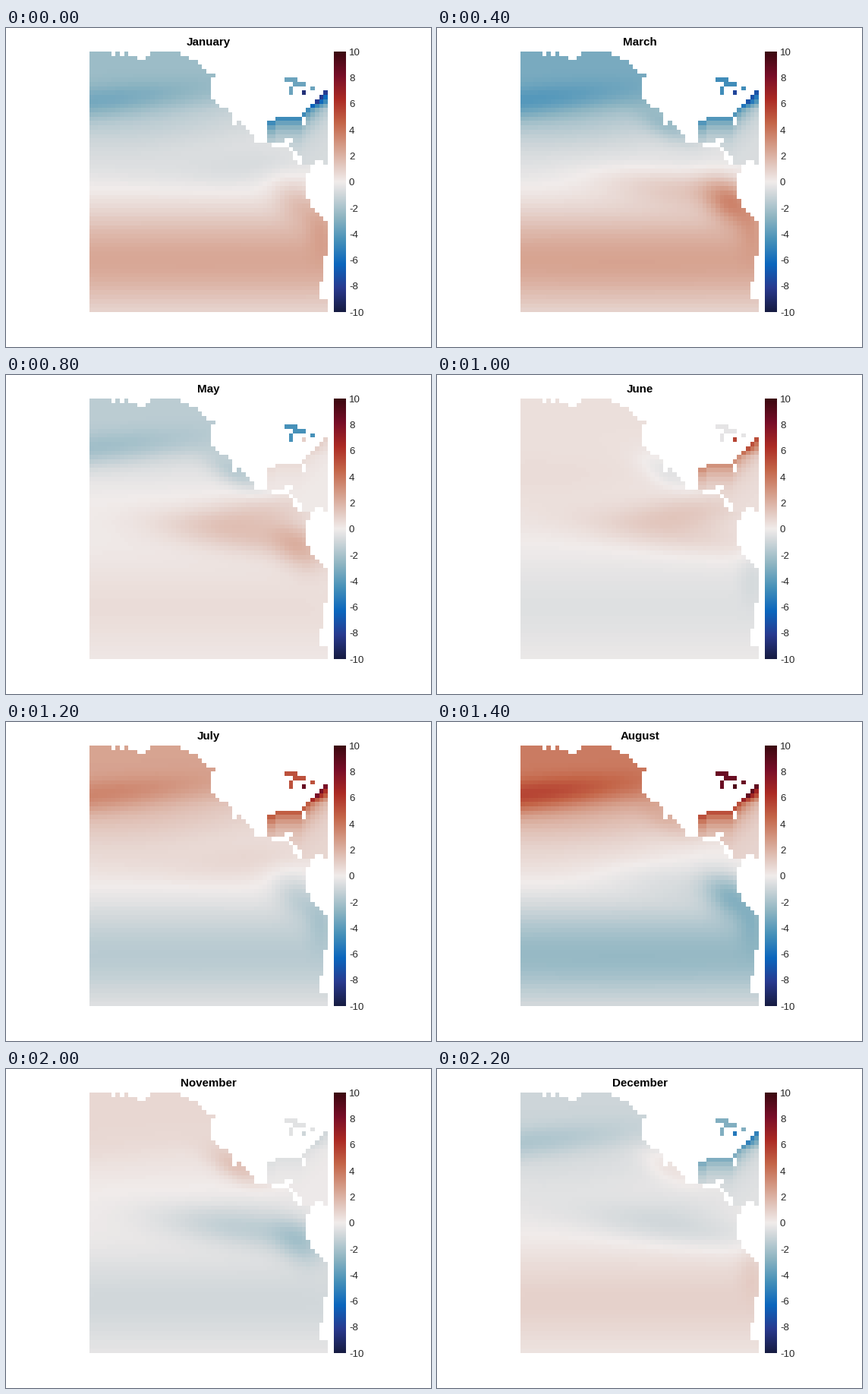
These frames come from a looping animation (560 by 420 pixels, 2.4 s). A matplotlib script:

```python
import numpy as np
import matplotlib.pyplot as plt
from matplotlib.animation import FuncAnimation
from matplotlib.colors import LinearSegmentedColormap

W, H, DPI = 560, 420, 100
ROWS, COLS = 60, 55
LEFT, RIGHT, TOP, BOTTOM = 110, 424, 31, 374
MONTHS = ["January", "February", "March", "April", "May", "June", "July",
          "August", "September", "October", "November", "December"]
plt.rcParams["font.family"] = "Liberation Sans"

# Diverging palette: navy, blue, grey-white, red, maroon
cold = ["#171c42", "#293a8f", "#0b66bd", "#4590b9", "#8eb5c2", "#d2d8db"]
warm = ["#e6d2cc", "#d59d89", "#c46548", "#ac2b24", "#780e28", "#3c0911"]
places = np.linspace(0, 1, 12)
cmap = LinearSegmentedColormap.from_list(
    "diverging",
    [*zip(places[:6], cold), (0.5, "#f1eceb"), *zip(places[6:], warm)], N=512)
cmap.set_bad("white")

# Cell centres in stage pixels
row, col = np.mgrid[0:ROWS, 0:COLS]
X = LEFT + (col + 0.5) * (RIGHT - LEFT) / COLS
Y = TOP + (row + 0.5) * (BOTTOM - TOP) / ROWS


# --- Coastline -------------------------------------------------------------
def coast(*points):
    """Column of the shore in every row, drawn through (row, column) points."""
    r, c = zip(*points)
    return np.round(np.interp(np.arange(ROWS), r, c)).astype(int)[:, None]


pacific = col < coast((0, 21), (2, 25), (5, 28), (10, 28), (14, 33), (19, 38),
                      (20, 38), (22, 46), (25, 48), (26, 51), (29, 50), (33, 50),
                      (36, 52), (39, 55), (46, 55), (47, 54), (52, 54), (53, 53),
                      (56, 53), (57, 55))
pacific[5, 28] = True
pacific[0, 5:8:2] = pacific[0, 9:14] = pacific[1, 11:13] = False
pacific[15:17, 33] = False

carib = col >= coast((8, 55), (14, 49), (15, 43), (16, 41), (20, 41), (21, 46),
                     (24, 49), (25, 49), (26, 55))
carib[15:17, 49] = carib[20, 45:47] = carib[25, 52:54] = False

islands = np.zeros((ROWS, COLS), bool)
islands[6, 45:48] = islands[7, 47:50] = True
islands[8:10, 46] = islands[8, 51] = islands[9, 49] = True
spot = (row == 9) & (col == 49)
water = pacific | carib | islands


# --- Temperature model -----------------------------------------------------
def season(m, amp, peak, half=0, half_peak=0):
    """Yearly wave plus an optional half-yearly one; peaks are months from 0."""
    return (amp * np.cos(2 * np.pi * (m - peak) / 12)
            + half * np.cos(2 * np.pi * (m - half_peak) / 6))


def pool(cx, cy, sx, sy, tilt=0):
    dx = X - cx
    dy = Y - cy - tilt * dx
    return np.exp(-0.5 * ((dx / sx) ** 2 + (dy / sy) ** 2))


WIDE = 1000
slope = 0.1 * (X - 150) * np.clip((150 - Y) / 40, 0, 1)
north = 1 / (1 + np.exp((Y + slope - 118) / 12))

# Each part of the ocean: its shape and its seasonal wave
parts = [
    (north, (3.6, 7.6, 0.4, 7.3)),
    (pool(120, 96, 95, 14, -0.1), (1.6, 7.5, 0.5, 7.5)),
    (pool(150, 135, 150, 22, -0.05), (0.9, 7.2)),
    (pool(170, 180, 150, 28), (0.6, 7)),
    (pool(305, 128, 26, 14, 0.4), (1.5, 9)),
    (pool(340, 178, 60, 16, -0.1), (0.6, 4.5, 0.4, 4.5)),
    (pool(320, 210, 85, 18, 0.12), (1.4, 3.2)),
    (pool(387, 230, 24, 20, 0.4), (2.3, 2)),
    (pool(415, 262, 12, 25), (0.8, 0.8)),
    (pool(250, 306, WIDE, 46), (2.8, 1.5, 0.4, 0)),
]

# The eastern basin swings most along its northern shore
depth = np.clip(row - carib.argmax(axis=0), 0, None)
corner = np.clip((13 - row) / 2, 0, 1)
swing = (0.8 + 4.4 * np.exp(-depth / 3)) * (1 + 0.7 * corner)


def anomaly(m):
    field = sum(shape * season(m, *wave) for shape, wave in parts)
    field = np.where(carib, swing * season(m, 1, 6.8), field)
    field = np.where(islands, season(m, 6.5, 7.6, 2.5, 7.2), field)
    field = np.where(spot, season(m, 9.5, 6.8), field)
    return np.ma.array(field, mask=~water)


# --- Stage -----------------------------------------------------------------
def px(size):
    return size * 72 / DPI


fig = plt.figure(figsize=(W / DPI, H / DPI), dpi=DPI, facecolor="white")
ax = fig.add_axes([0, 0, 1, 1])
ax.axis("off")

style = dict(cmap=cmap, vmin=-10, vmax=10, interpolation="nearest", aspect="auto")
sea = ax.imshow(anomaly(0), extent=(LEFT, RIGHT, BOTTOM, TOP), **style)
ax.imshow(np.linspace(10, -10, BOTTOM - TOP)[:, None],
          extent=(432, 448, BOTTOM, TOP), **style)
ax.set(xlim=(0, W), ylim=(H, 0))

for v in range(-10, 11, 2):
    y = (TOP + BOTTOM) / 2 - v * (BOTTOM - TOP) / 20
    ax.text(452, y + 4.7, str(v), fontsize=px(13.2), color="#262626", va="baseline")
title = ax.text(267, 23, "", fontsize=px(15.1), weight="bold", color="black",
                ha="center", va="baseline")


def draw(m):
    sea.set_data(anomaly(m))
    title.set_text(MONTHS[m])
    return sea, title


anim = FuncAnimation(fig, draw, frames=12, interval=200, repeat=True, repeat_delay=0)
plt.show()
```
